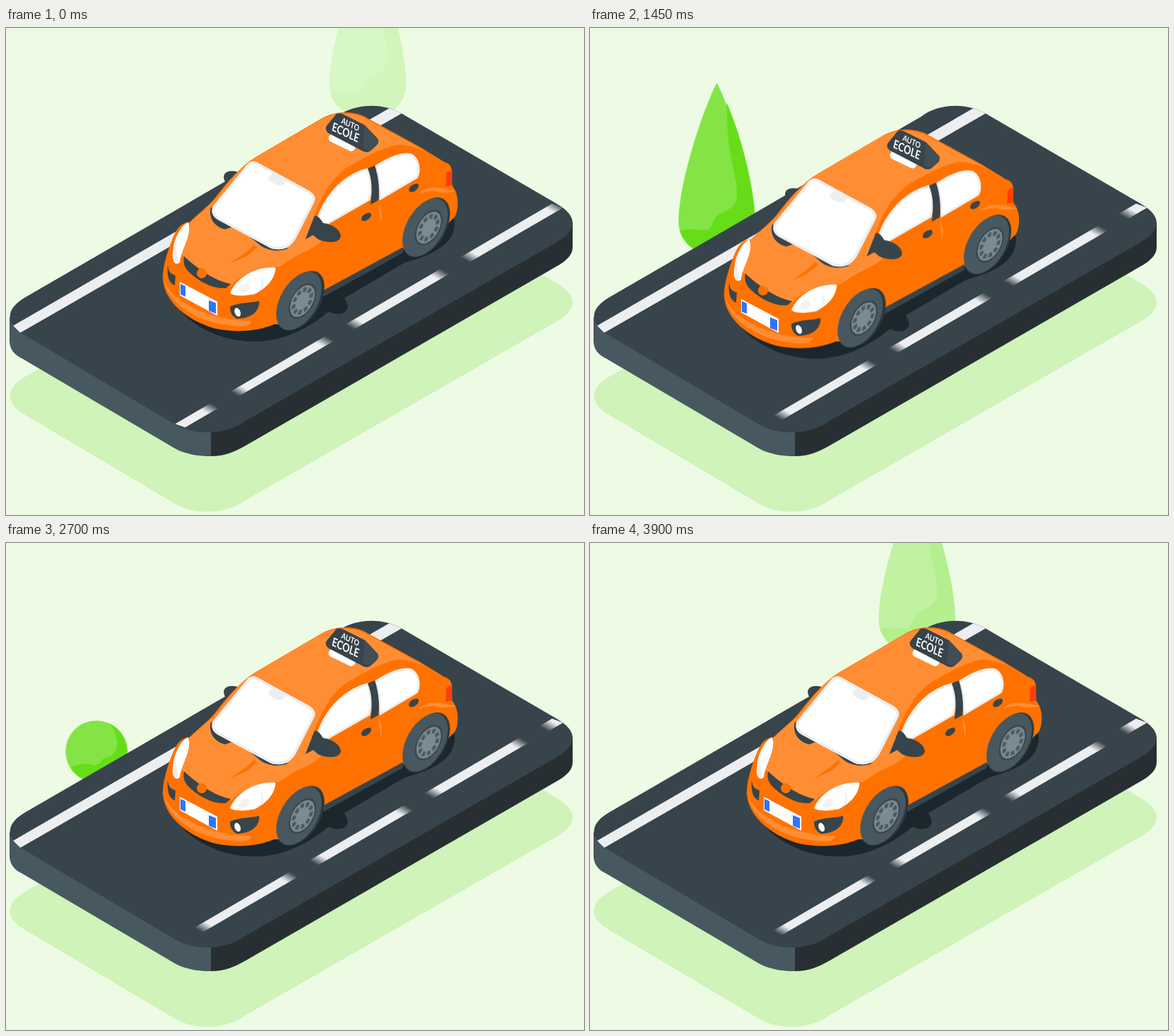
Recreate the animation shown at these times as an HTML page. Size 815 by 687 pixels, loop 3950 ms.

```html
<!DOCTYPE html>
<html lang="fr">
<head>
<meta charset="utf-8">
<title>Auto école</title>
<style>
  html, body { margin: 0; width: 100%; height: 100%; overflow: hidden; background: #edfbe5; }
  svg { display: block; width: 100vw; height: 100vh; }

  .car, .dashes, .tree, .spin, .glint { animation: 3950ms linear infinite; }
  .car { animation-name: sway; }
  .dashes { animation-name: road; }
  .spin { animation-name: spin; }
  .glint { animation-name: glint; }
  .tree { animation-name: ride; animation-delay: calc(var(--start) - 3950ms); }
  .late { animation-name: ride-late; }

  @keyframes sway {
    0% { transform: none; animation-timing-function: cubic-bezier(.37, 0, .63, 1); }
    22.78% { transform: translate(-33px, 25px); }
    33.9% { transform: translate(-33px, 25px); animation-timing-function: cubic-bezier(.37, 0, .63, 1); }
    59.2%, 100% { transform: none; }
  }
  /* thirteen dash periods per loop */
  @keyframes road {
    0% { transform: none; }
    13.924% { transform: translate(292.5px, -170.8px); }
    26.582% { transform: translate(545px, -318.3px); }
    46.835% { transform: translate(962px, -561.8px); }
    60.759% { transform: translate(1255px, -732.9px); }
    77.215% { transform: translate(1589px, -928px); }
    98.734% { transform: translate(2050px, -1197.2px); }
    100% { transform: translate(2108.6px, -1231.4px); }
  }
  @keyframes ride {
    0% { transform: translate(-60px, 35.1px); opacity: 1; }
    17.56% { transform: translate(345px, -201.8px); opacity: 1; }
    26.66%, 100% { transform: translate(555px, -324.7px); opacity: 0; }
  }
  @keyframes ride-late {
    0% { transform: translate(-65px, 38px); opacity: 1; }
    6.835% { transform: translate(98px, -57.3px); opacity: 1; }
    17.2% { transform: translate(345px, -201.8px); opacity: 1; }
    22.025% { transform: translate(460px, -269.1px); opacity: .43; }
    23.291% { transform: translate(509px, -297.8px); opacity: .21; }
    24.5%, 100% { transform: translate(555px, -324.7px); opacity: 0; }
  }
  @keyframes spin { to { transform: rotate(-3960deg); } }
  @keyframes glint {
    0% { transform: translateX(-220px); }
    27.848% { transform: translateX(220px); }
    27.849%, 46.835% { transform: translateX(-220px); }
    74.684%, 100% { transform: translateX(220px); }
  }
  .sign text { font-family: Lato, "Open Sans", sans-serif; font-weight: 700; fill: #fff; text-anchor: middle; }
</style>
</head>
<body>
<svg viewBox="0 0 815 687">
  <defs>
    <path id="slab" d="M24 432C-1 417-1 396 27 380L467 125C492 105 535 105 562 123L775 247C807 265 807 285 775 303L338 554C310 575 265 575 238 559Z"/>
    <clipPath id="slabClip"><use href="#slab"/></clipPath>
    <clipPath id="lane"><path d="M238.5 558.5L770 247.8L785.5 253.6L252.5 563.5Z"/></clipPath>
    <path id="screen" d="M353 189L428 230Q439 237 434 247L408 298C399 312 388 314 374 311L298 270Q286 262 293 250L338 195Q344 186 353 189Z"/>
    <clipPath id="screenClip"><use href="#screen"/></clipPath>

    <linearGradient id="dash" gradientUnits="userSpaceOnUse" spreadMethod="repeat" x1="470" y1="430" x2="551.6" y2="288.7">
      <stop offset=".085" stop-color="#eceef0" stop-opacity="0"/>
      <stop offset=".175" stop-color="#eceef0"/>
      <stop offset=".825" stop-color="#eceef0"/>
      <stop offset=".915" stop-color="#eceef0" stop-opacity="0"/>
    </linearGradient>

    <g id="bush">
      <circle r="43.5" fill="#84e445"/>
      <path fill="#66dd18" d="M20-38.6C34-16 32 4 14 8.500C5 11 8 18-3 20C-14 15-26 18-37 22.5A43.5 43.5 0 1 0 20-38.6Z"/>
    </g>
    <g id="cypress">
      <path fill="#84e445" d="M0-195C23-150 54-50 54 0C54 30 30 48 0 48S-54 30-54 0C-54-50-23-150 0-195Z"/>
      <path fill="#66dd18" d="M14-167C14-80 32-62 28-32C24-10 0-18-6 3C-12 22-32 6-52 14C-45 36-25 48 0 48C30 48 54 30 54 0C54-45 34-122 14-167Z"/>
    </g>

    <g id="wheel">
      <circle r="37" fill="#485860"/>
      <g transform="translate(5.7 3)">
        <circle r="22.5" fill="#38444c"/>
        <circle r="20" fill="#7c8b93"/>
        <g class="spin">
          <circle r="14.5" fill="none" stroke="#4a5a63" stroke-width="6" pathLength="100" stroke-dasharray="6.5 3.5"/>
        </g>
      </g>
    </g>
  </defs>

  <use href="#slab" y="112" fill="#cff3b8"/>

  <g transform="translate(0 368.5)">
    <use href="#bush" class="tree" style="--start: 338ms"/>
    <use href="#bush" class="tree" style="--start: 2380ms"/>
  </g>
  <g transform="translate(0 377)">
    <use href="#cypress" class="tree" style="--start: 1042ms"/>
    <use href="#cypress" class="tree late" style="--start: 3030ms"/>
  </g>

  <!-- road -->
  <path fill="#485860" d="M5 408V443C6 456 14 462 24 467L238 593C252 601 270 604 289 604V540Z"/>
  <path fill="#282f33" d="M289 540V604C308 604 322 598 338 589L775 337C791 328 799 320 799 309V274Z"/>
  <use href="#slab" fill="#38444c"/>
  <g clip-path="url(#slabClip)">
    <path fill="#eceef0" d="M10 420L546 110L564 117L20 430Z"/>
    <g clip-path="url(#lane)">
      <rect class="dashes" x="-2200" width="3100" height="1900" fill="url(#dash)"/>
    </g>
  </g>

  <g class="car">
    <!-- ground shadow -->
    <path fill="#1b262d" d="M232 380C258 424 310 445 360 442C400 439 432 419 455 400C468 407 482 403 482 392L477 381L562 331C610 318 637 300 632 268L550 285L400 340Z"/>
    <path fill="#38444c" d="M309 217C303 206 311 199 327 203L330 208L314 220Z"/>

    <!-- body -->
    <path fill="#ff7200" d="M221 352C221 335 229 310 237 292C243 279 250 274 259 274C275 258 288 249 296 238C315 213 333 194 352 182L446 127C465 117 486 117 504 124L584 168L618 189Q628 191 629 203V222Q637 232 637 247C637 260 633 268 629 270L600 300L558 312L448 376L400 418L378 418C355 428 325 430 295 424C255 413 222 385 221 352Z"/>
    <path fill="#ff8d34" d="M346 186L446 128C465 119 484 119 502 125L583 169L616 189C596 175 572 163 549 165C528 170 504 183 482 196C460 211 444 236 433 270L424 296C415 313 402 327 385 337C360 338 330 348 318 363C290 354 264 338 251 322L241 318C247 302 259 288 259 274C280 256 290 248 300 236C316 214 330 198 346 186Z"/>
    <path fill="#ff8d34" d="M385 337C410 318 440 311 447 297L434 293L420 286ZM223 358C236 386 285 413 346 413Q345 420 333 421C280 420 232 395 223 358Z"/>
    <path fill="#ff7200" d="M317 331C332 321 343 314 349 306L354 309C345 319 334 326 317 331Z"/>
    <path fill="#ff8d34" d="M582 234C596 220 614 226 635 230Q625 233 612 232C600 228 592 231 582 234ZM526 247Q531 258 529 275Q526 260 526 247Z"/>
    <path fill="#ff3d00" d="M621 204L628 201Q630 211 628 222L620 224Z"/>

    <!-- windscreen -->
    <path fill="#38444c" d="M289 252C284 271 298 282 309 284L318 281C337 286 348 299 362 309Q380 318 398 311L375 305L297 266Z"/>
    <use href="#screen" fill="#fff"/>
    <g clip-path="url(#screenClip)">
      <path fill="#eceef0" d="M369 212L376 205L395 215L391 221Q379 224 369 212Z"/>
      <path class="glint" fill="#e8effd" opacity=".95" d="M360 180H398L413 320H378Z"/>
      <use href="#screen" fill="none" stroke="#eceef0" stroke-width="7"/>
    </g>

    <!-- side windows -->
    <g fill="#fff" stroke="#eceef0" stroke-width="3">
      <path d="M439 271C445 252 455 236 469 222C483 209 498 202 510 199C515 214 516 228 512 242L453 276Q440 281 439 271Z"/>
      <path d="M522 195C540 183 560 175 572 179C583 186 584 203 579 211L528 241Q527 215 522 195Z"/>
    </g>
    <path fill="#38444c" d="M510 198L520 194C526 212 527 230 525 243L514 249C517 230 516 212 510 198Z"/>
    <g fill="#38444c">
      <ellipse cx="508" cy="266.500" rx="8" ry="4.500" transform="rotate(-35 508 266.500)"/>
      <ellipse cx="575" cy="225.500" rx="8" ry="4.500" transform="rotate(-35 575 225.500)"/>
      <path d="M422 298L435 265Q440 263 447 275C461 277 472 285 472 294C470 304 453 304 440 298L433 292Z"/>
      <path d="M446 371L560 309V317L448 379Z"/>
    </g>

    <!-- wheels -->
    <g fill="#2c363c">
      <circle r="37" transform="matrix(.866 -.5 0 1 417 384)"/>
      <circle r="37" transform="matrix(.866 -.5 0 1 594 280.5)"/>
    </g>
    <use href="#wheel" transform="matrix(.866 -.5 0 1 413 385)"/>
    <use href="#wheel" transform="matrix(.866 -.5 0 1 591 281.5)"/>

    <!-- front -->
    <path fill="#fff" d="M257 274C245 279 235 301 235 324Q237 336 245 331C247 312 263 292 257 274Z"/>
    <path fill="#eceef0" d="M242 291C235 303 235 315 237 329L244 331C239 316 239 304 242 291Z"/>
    <path fill="#fff" d="M316 374C325 351 354 336 380 338C380 356 361 375 340 377Q323 379 316 374Z"/>
    <path fill="#eceef0" d="M346 377C364 373 368 357 357 350Q368 366 346 377Z"/>
    <ellipse cx="336" cy="367" rx="8" ry="6" fill="#f2f3f5" transform="rotate(-30 336 367)"/>
    <g fill="#38444c">
      <path d="M251 322C249 333 253 340 260 346C273 358 291 368 310 367L317 361C294 357 268 338 251 322Z"/>
      <path d="M228 334C229 345 233 347 239 349L238 363Q226 359 228 334Z"/>
      <path d="M316 393C328 387 345 388 357 385C358 400 345 410 325 410Q315 404 316 393Z"/>
    </g>
    <circle cx="276" cy="346" r="7" fill="#ff7200"/>
    <ellipse cx="326.500" cy="401" rx="4" ry="6.500" fill="#fff" transform="rotate(-22 326.500 401)"/>
    <path fill="#fff" d="M245 358L298 386V406L245 377Z"/>
    <path fill="#2f74ff" d="M246 361L253 364V379L246 376ZM286 384L296 388V403L286 399Z"/>

    <!-- roof sign -->
    <g class="sign">
      <path fill="#fff" d="M458 150L493 166Q493 173 486 174L457 160Q452 155 458 150Z"/>
      <path fill="#38444c" d="M466 121Q470 119 476 122L506 137L524 156Q527 162 522 166L513 174Q507 177 500 172L454 148Q449 143 452 138Z"/>
      <path fill="#414e56" d="M506 138L524 157Q526 162 521 166L512 173L503 170Z"/>
      <text font-size="10" transform="matrix(.88 .42 -.28 1.1 484.500 140)">AUTO</text>
      <text font-size="14" transform="matrix(.86 .4 -.28 1.15 477.500 153)">ECOLE</text>
    </g>
  </g>
</svg>
</body>
</html>
```
